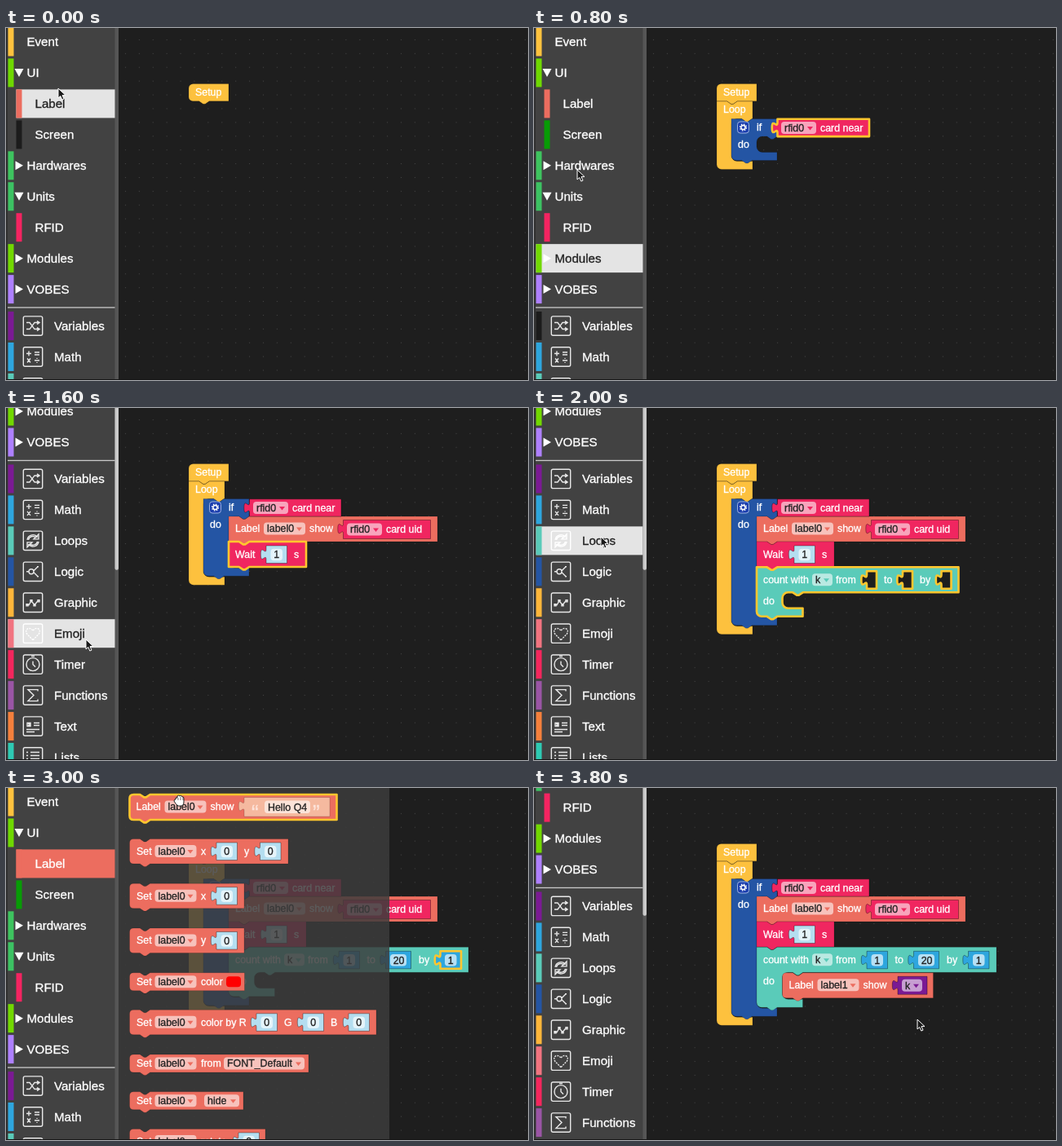
These frames come from a looping animation (640 px wide and 432 px high, 4 s). An HTML page:

```html
<!DOCTYPE html>
<html lang="en">
<head>
<meta charset="utf-8">
<title>Block editor</title>
<style>
html, body { margin: 0; width: 100%; height: 100%; overflow: hidden; background: #1e1e1e; }
svg { display: block; width: 640px; height: 432px; }
text { font-family: "Liberation Sans", Arial, sans-serif; white-space: pre; stroke-width: .32px; }
</style>
</head>
<body>
<svg id="stage" viewBox="0 0 640 432"></svg>
<script>
const stage = document.getElementById('stage');
const STEP = 200;
const GOLD = '#fdc13e', RED = '#ec6d5f', PINK = '#f02660', BLUE = '#2455a4',
  TEAL = '#5acbb9', SKY = '#2ea6de', PALE = '#b4def0', PURPLE = '#7b1a94';
const FOOT = 11;

// Basic pieces
const text = (x, y, s, fill = '#fff', size = 12.4) =>
  `<text x="${x}" y="${y + size * .35}" font-size="${size}" fill="${fill}" stroke="${fill}">${s}</text>`;
const rect = (x, y, w, h, fill, more = '') =>
  `<rect x="${x}" y="${y}" width="${w}" height="${h}" fill="${fill}" ${more}/>`;
const path = (d, fill, more = '') => `<path d="${d}" fill="${fill}" ${more}/>`;
const shape = (d, fill, sel, edge = .2) => path(d, fill, sel
  ? 'stroke="#ffc62e" stroke-width="2.6" stroke-linejoin="round"'
  : `stroke="#000" stroke-opacity="${edge}" stroke-width=".9"`);

// Puzzle outlines
const NOTCH = 'l5 3.4h2.5l5 -3.4';
const BUMP = 'l-5 3.4h-2.5l-5 -3.4';
const valuePath = (x, y, w, h) => `M${x} ${y}h${w}v${h}h${-w}v${17 - h}` +
  'c0 -8.4 -6.7 6.8 -6.7 -6.3s6.7 2.1 6.7 -6.4z';
const stackPath = (x, y, w, h, r = 0) =>
  `M${x} ${y + r}q0 ${-r} ${r} ${-r}H${x + 12.7}${NOTCH}H${x + w}V${y + h}H${x + 25.2}${BUMP}` +
  `H${x + r}q${-r} 0 ${-r} ${-r}z`;
function mouthPath(x, y, right, row, arm, end, foot, bump) {
  const low = end + FOOT;
  return `M${x} ${y}h12.7${NOTCH}H${right}V${y + row}H${arm + 25.2}${BUMP}H${arm + 7}` +
    `a7 7 0 0 0 -7 7V${end - 6}a7 7 0 0 0 7 7H${foot}V${low}` +
    (bump ? `H${x + 25.2}${BUMP}` : '') + `H${x + 6}a6 6 0 0 1 -6 -6z`;
}
const socket = (x, y, w, h, color, sel) => shape(valuePath(x, y, w, h), color, sel, .4);

// Fields and small blocks
const MENU = { rfid0: 43, label0: 51, label1: 51, k: 25, FONT_Default: 99, hide: 43 };
function menu(x, cy, s, color) {
  const w = MENU[s], a = x + w - 11;
  return rect(x, cy - 7.5, w, 15, '#fff', 'rx="4" fill-opacity=".58"') +
    text(x + 4, cy, s, '#222') + path(`M${a} ${cy - 1.5}h7l-3.5 4.5z`, color);
}
function num(x, y, s, color, sel) {
  const w = s.length > 1 ? 31 : 25.5;
  return socket(x, y, w, 21.5, color, sel) +
    rect(x + 5.5, y + 3.7, w - 11, 14.5, '#fff', 'rx="4" fill-opacity=".65"') +
    text(x + 9.2, y + 11, s, '#222');
}
const card = (x, y, s, w, h, sel) => socket(x, y, w, h, PINK, sel) +
  menu(x + 4.5, y + h / 2, 'rfid0', PINK) + text(x + 52.5, y + h / 2, s);
function hello(x, y) {
  return shape(valuePath(x, y, 105, 23.5), '#f5b99f') +
    text(x + 9, y + 18, '“', '#fde3da', 26) + text(x + 84, y + 18, '”', '#fde3da', 26) +
    rect(x + 25, y + 4, 56, 15.5, '#fff', 'rx="4" fill-opacity=".6"') +
    text(x + 29, y + 12, 'Hello Q4', '#222');
}
function labelBlock(x, y, name, value, sel, round) {
  const vx = x + 140.5, w = { uid: 107, k: 36, hello: 105, none: 12 }[value];
  let s = shape(stackPath(x, y, w + 149, 31, round), RED, sel) + text(x + 8, y + 15, 'Label') +
    menu(x + 43, y + 15, name, RED) + text(x + 99, y + 15, 'show');
  if (value === 'uid') s += card(vx, y + 4.5, 'card uid', w, 23);
  if (value === 'k') s += socket(vx + 1, y + 4.5, w, 22, PURPLE) + menu(vx + 6, y + 15.5, 'k', PURPLE);
  if (value === 'hello') s += hello(vx, y + 3.5);
  if (value === 'none') s += path(valuePath(vx, y + 4.5, w, 22), '#1e1e1e');
  return s;
}
function countBlock(st, y) {
  let x = 408, parts = '';
  const names = ['to', 'by'], gaps = [23, 26.5], sel = st.sel === 'count';
  st.count.forEach((v, i) => {
    parts += v ? num(x, y + 5, v, SKY, st.sel === 'n' + i)
      : shape(valuePath(x, y + 5, 12, 21.5), '#1e1e1e', sel);
    x += !v ? 12 : v.length > 1 ? 31.5 : 25.5;
    if (i < 2) {
      parts += text(x + 9, y + 15.5, names[i]);
      x += 9 + gaps[i];
    }
  });
  const end = y + (st.inner ? 63 : 49.5);
  let s = shape(mouthPath(273, y, x + 9, 31, 304.5, end, 329.5, true), TEAL, sel) +
    text(281, y + 15.5, 'count with') + menu(341, y + 15.5, 'k', TEAL) +
    text(370, y + 15.5, 'from') + text(281, y + 41.5, 'do') + parts;
  if (st.inner) s += labelBlock(304.5, y + 31.5, 'label1', st.inner, st.sel === 'inner', 5);
  return [s, end + FOOT];
}

function gear(x, y) {
  return rect(x - 7, y - 7, 14, 14, '#1c3fae', 'rx="3.5" stroke="#a9bde8" stroke-width=".9"') +
    `<circle cx="${x}" cy="${y}" r="2.6" fill="none" stroke="#fff" stroke-width="1.5"/>` +
    `<circle cx="${x}" cy="${y}" r="4" fill="none" stroke="#fff" stroke-width="1.3" stroke-dasharray="1.5 1.64"/>`;
}

function workspace(st) {
  let inside = '', end = 151.5, y = 133;
  if (st.label) {
    inside += labelBlock(273, y, 'label0', st.label, st.sel === 'label');
    end = y += 31;
  }
  if (st.wait) {
    inside += shape(stackPath(273, y, 95, 31), PINK, st.sel === 'wait') + text(281, y + 15.5, 'Wait') +
      num(319, y + 5, '1', PALE) + text(353, y + 15.5, 's');
    end = y += 31.3;
  }
  if (st.count) {
    const [s, low] = countBlock(st, y);
    inside += s;
    end = low;
  }
  let s = '';
  if (st.loop) {
    const low = st.iff ? end + FOOT : 132;
    s += shape(mouthPath(224, 90, 268, 21.5, 242, low, 268), GOLD) + text(232, 100, 'Loop');
  }
  const corner = st.loop ? 'H224' : 'H229a5 5 0 0 1 -5 -5';
  s += shape(`M224 74a5.5 5.5 0 0 1 5.5 -5.5H273V89.8H249.2${BUMP}${corner}z`, GOLD) + text(232, 79, 'Setup');
  if (st.iff) {
    s += shape(mouthPath(242, 111.5, 298, 21.5, 273, end, 298, true), BLUE) +
      gear(256.5, 122) + text(273, 122, 'if') + text(250, 143, 'do');
  }
  s += inside;
  if (st.near) s += card(298.5 + st.drag, 111.8 + st.drag, 'card near', 112.5, 21.3, st.sel === 'near');
  if (st.loose) s += num(...st.loose, '1', SKY, true);
  return s;
}

// Side list
const ITEMS = [
  ['Event', '#ffc23e'], ['UI', '#6fd900', 'open'], ['Label', RED, 'child'], ['Screen', '#079c05', 'child'],
  ['Hardwares', '#3ec45f', 'shut'], ['Units', '#3cc263', 'open'], ['RFID', '#f42461', 'child'],
  ['Modules', '#72d900', 'shut'], ['VOBES', '#ae80ff', 'shut'],
  ['Variables', PURPLE, 'M-8 -4h4l6 8h5M-8 4h4l6 -8h5M5 -6l3 2l-3 2M5 2l3 2l-3 2'],
  ['Math', SKY, 'M-8 -4h6M-5 -7v6M2 -5.5h6M2 -2.5h6M-7 2l4 5M-3 2l-4 5M2 4.5h6M5 1.5v1M5 6.5v1'],
  ['Loops', TEAL, 'M-7 -1a7 7 0 0 1 12 -4M7 1a7 7 0 0 1 -12 4M7 -8v6h-6zM-7 8v-6h6zM-5.5 -1a5.5 5.5 0 0 1 9 -3M5.5 1a5.5 5.5 0 0 1 -9 3M3 -4l3 -1M-3 4l-3 1'],
  ['Logic', BLUE, 'M-8 0h3M1 -1l5 -5M1 1l5 5M-5 0a3 3 0 1 0 6 0a3 3 0 1 0 -6 0M5 -6h2M5 6h2'],
  ['Graphic', '#ffb63a', 'M-8 3h3l3 -5l4 5l4 -5M-8 2h2v2h-2zM-3 -3h2v2h-2zM1 2h2v2h-2zM6 -3h2v2h-2z'],
  ['Emoji', '#f17480', 'M0 8l-7 -7q-3 -5 1 -7q4 -1 6 3q2 -4 6 -3q4 2 1 7z'],
  ['Timer', '#f4265d', 'M-8 0a8 8 0 1 0 16 0a8 8 0 1 0 -16 0M0 -4v4l3 3M-2 -10h4'],
  ['Functions', '#9a55a5', 'M6 -5v-2h-12l7 7l-7 7h12v-2'],
  ['Text', '#f5803c', 'M-7 -4h4v4h-4zM-6 -3h2v2h-2M1 -4h7M1 -1h7M-8 4h16M-8 7h10'],
  ['Lists', '#2ecab3', 'M-8 -6h2M-3 -6h11M-8 -2h2M-3 -2h11M-8 2h2M-3 2h11M-8 6h2M-3 6h11']
];
function sidebar(st) {
  let s = rect(0, 0, 138, 432, '#424242') + rect(0, 0, 2, 432, '#303030') +
    rect(133.5, 0, 4.5, 432, '#565656');
  ITEMS.forEach(([name, color, kind = ''], i) => {
    const cy = (i < 9 ? 17 : 24) + 37.95 * i - st.scroll;
    if (cy < -20 || cy > 452) return;
    const child = kind === 'child', icon = kind[0] === 'M', x = child ? 12.5 : 2.5;
    const hover = st.hover === name, active = st.active === name;
    if (hover || active) s += rect(x, cy - 17.5, 133.5 - x, 35, hover ? '#e4e4e4' : color);
    s += rect(x, cy - 17.5, 7, 35, st.dark === name ? '#1c1c1c' : color);
    if (kind === 'open') s += path(`M10.5 ${cy - 5}h11l-5.5 10z`, '#fff');
    if (kind === 'shut') s += path(`M11.5 ${cy - 5.5}v11l9.5 -5.5z`, '#fff');
    if (icon) {
      s += `<g transform="translate(33 ${cy})" fill="none" stroke="${hover ? '#fff' : '#e8e8e8'}" stroke-width="1.4">` +
        `<rect x="-11.7" y="-11.7" width="23.4" height="23.4" rx="2"/><path d="${kind}"` +
        `${name === 'Emoji' ? ' stroke-dasharray="2 1.2"' : ''}/></g>`;
    }
    s += text(child ? 35.5 : icon ? 59 : 25.5, cy - .2, name, hover ? '#222' : '#fff', 15.1);
  });
  s += rect(2, 342.4 - st.scroll, 131.5, 1.3, '#c9c9c9');
  const thumb = .724 * st.scroll - 3;
  if (thumb > 0) s += rect(133.5, -5, 4.5, thumb + 5, '#cacaca', 'rx="2"');
  return s;
}

// Block drawer: pairs of word and x, then inputs
function setBlock(y, right, h, words, nums = []) {
  const cy = y + (h > 25 ? 15 : 11);
  return shape(stackPath(151.5, y, right - 151.5, h, 5), RED) + text(160, cy, 'Set') +
    menu(182.5, cy, 'label0', RED) + words.map(([s, x]) => text(x, cy, s)).join('') +
    nums.map(x => num(x, y + 4.5, '0', PALE)).join('');
}
function drawer() {
  return rect(138, 0, 332, 432, '#3c3c3c', 'fill-opacity=".84"') +
    labelBlock(151.5, 8, 'label0', 'hello', true, 5) +
    setBlock(62.5, 346, 30.5, [['x', 239], ['y', 292]], [258, 311.5]) +
    setBlock(117.2, 292, 30.5, [['x', 239]], [258]) +
    setBlock(172, 292, 30.5, [['y', 239]], [258]) +
    setBlock(226.7, 292.5, 22, [['color', 239]]) + rect(270, 231.2, 18, 13, '#f00', 'rx="4"') +
    setBlock(272.3, 454, 30.5, [['color by R', 239], ['G', 341], ['B', 398]], [307, 364, 420]) +
    setBlock(327, 371, 22, [['from', 239]]) + menu(267, 338, 'FONT_Default', RED) +
    setBlock(372.8, 291, 22, []) + menu(243, 383.8, 'hide', RED) +
    setBlock(418.5, 318, 30.5, [['rotate', 239]], [285]);
}

function cursor([x, y, kind]) {
  const g = s => `<g transform="translate(${x} ${y})">${s}</g>`;
  if (kind === 'hand') return g(path('M-5 0q-1 -3 2 -2l0 -2q2 -2 3 0q2 -2 3 1q2 -1 2 2v4q0 5 -4 5h-3q-3 -2 -5 -6q0 -2 2 -2z',
    '#fff', 'stroke="#222"') + path('M-2 -2v3M1 -3v4M4 -2v3', 'none', 'stroke="#444" stroke-width=".8"'));
  if (kind === 'beam') return g('<circle cx="-18" cy="-5" r="8" fill="#8a8a8a" opacity=".8"/>' +
    path('M-3 -7q3 0 3 2v10q0 2 -3 2M3 -7q-3 0 -3 2v10q0 2 3 2M-2 2h4', 'none', 'stroke="#333" stroke-width="1.2"'));
  return g(path('M0 0v12l2.8 -2.5l2 4.6l2.2 -1l-2 -4.5h4z', '#1a1a1a', 'stroke="#fff" stroke-width="1"'));
}

// Every entry adds to the one before; sel, hover and the like last one step
const steps = [
  { scroll: 0, drag: 0, hover: 'Label', dark: 'Screen', at: [64, 74] },
  { loop: 1, at: [236, 106] },
  { scroll: 278.6, iff: 1, at: [258, 128] },
  { scroll: 0, near: 1, drag: 8, sel: 'near', at: [330, 136] },
  { drag: 0, sel: 'near', hover: 'Modules', dark: 'Variables', at: [53, 174] },
  { label: 'none', sel: 'label', at: [296, 150] },
  { label: 'uid', at: [440, 158] },
  { scroll: 278.6, hover: 'Timer', at: [84, 310] },
  { wait: 1, sel: 'wait', hover: 'Emoji', at: [98, 284] },
  { sel: 'wait', hover: 'Logic', at: [92, 200] },
  { count: ['', '', ''], sel: 'count', hover: 'Loops', at: [82, 158] },
  { count: ['1', '', ''], sel: 'n0', at: [420, 214] },
  { count: ['1', '1', ''], sel: 'n1', at: [482, 216, 'beam'] },
  { loose: [529, 204], at: [540, 216] },
  { scroll: 0, count: ['1', '20', '1'], sel: 'n2', at: [300, 150] },
  { sel: 'n2', active: 'Label', drawer: 1, at: [213, 14, 'hand'] },
  { inner: 'hello', sel: 'inner', at: [366, 246] },
  { scroll: 220.6, hover: 'Variables', at: [84, 146] },
  { inner: 'k', at: [458, 252] },
  { at: [470, 284] }
];
const BRIEF = { sel: '', hover: '', active: '', dark: '', drawer: 0, loose: null };
const states = [];
steps.reduce((last, step) => {
  const st = { ...last, ...BRIEF, ...step };
  states.push(st);
  return st;
}, {});

const GRID = '<defs><pattern id="dots" width="16.9" height="16.9" x="138" y="6" patternUnits="userSpaceOnUse">' +
  '<rect x="8" y="8" width="1" height="1" fill="#484848"/></pattern></defs>';
function draw(st) {
  stage.innerHTML = GRID + rect(0, 0, 640, 432, '#1e1e1e') + rect(138, 0, 502, 432, 'url(#dots)') +
    workspace(st) + (st.drawer ? drawer() : '') + sidebar(st) +
    rect(0, 431, 640, 1, '#161616') + cursor(st.at);
}

const start = performance.now();
let shown = -1;
function tick() {
  const i = Math.floor((performance.now() - start) / STEP) % states.length;
  if (i !== shown) draw(states[shown = i]);
  requestAnimationFrame(tick);
}
tick();
</script>
</body>
</html>
```
